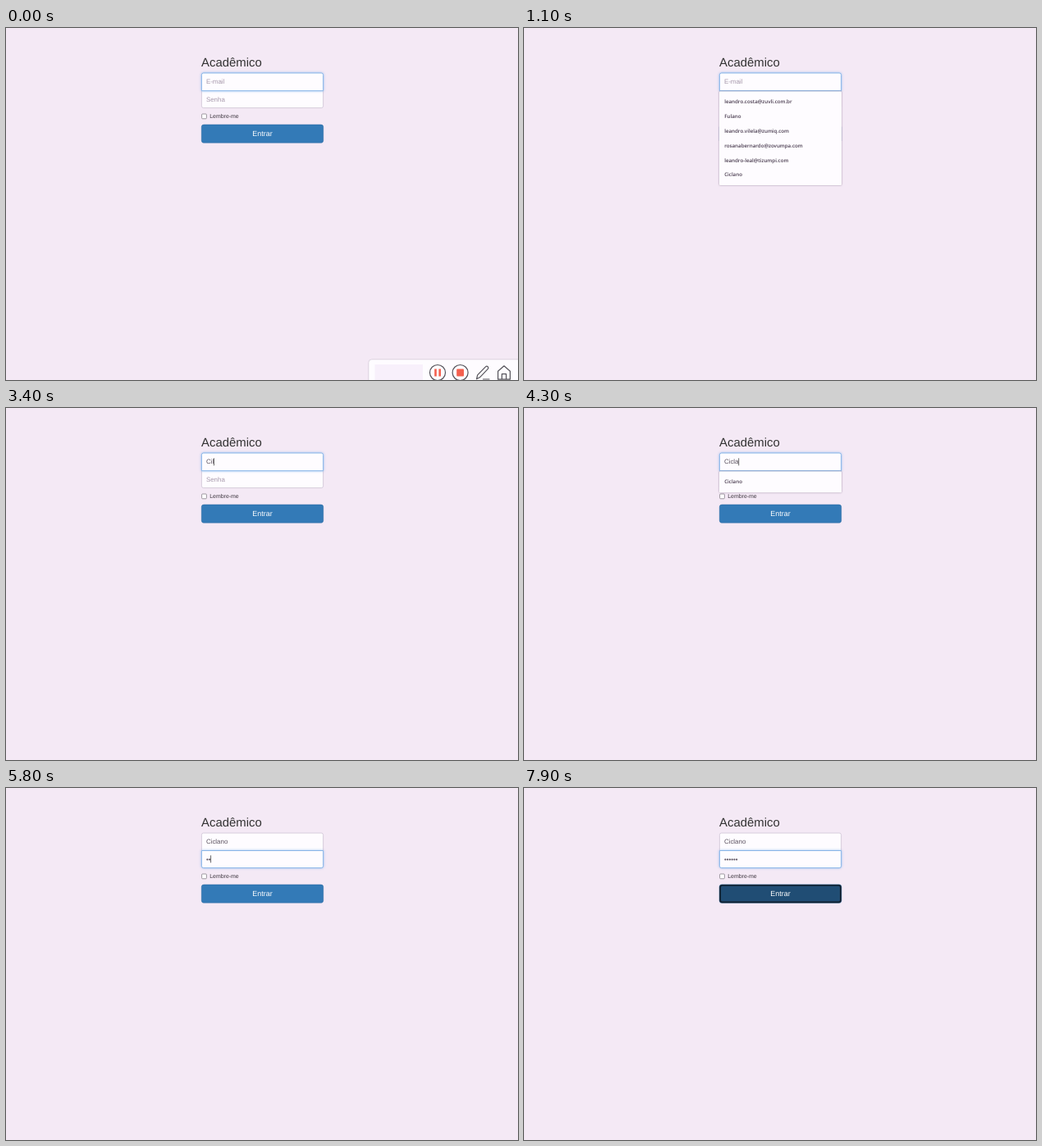
Animation, 624 px wide and 430 px high, one loop 8 s. Source, as an HTML page:

```html
<!DOCTYPE html>
<html lang="pt">
<head>
<meta charset="utf-8">
<style>
  html, body { margin: 0; width: 100%; height: 100%; overflow: hidden; background: #f4e9f5; }
  svg { display: block; width: 624px; height: 430px; }
  text { font: 7.95px "Liberation Sans", Arial, sans-serif; text-rendering: geometricPrecision; white-space: pre; }
  .box { fill: #fefcff; stroke-width: .9; }
  #menu text { font: 600 6.2px "Open Sans", "Noto Sans", sans-serif; fill: #4a3d50; }
  #menu rect { fill: #fefcff; filter: drop-shadow(0 .7px .8px rgba(60, 40, 70, .45)); }
  .icon { fill: none; stroke: #55535b; stroke-width: 1.2; stroke-linejoin: round; stroke-linecap: round; }
  .red { fill: #f4604f; stroke: none; }
</style>
</head>
<body>
<svg viewBox="0 0 624 430">
  <text x="238" y="47" style="font-size:14.9px" fill="#333">Acadêmico</text>

  <rect x="238.6" y="105" width="5.8" height="5.8" rx="1" fill="#fff" stroke="#767079" stroke-width=".7"/>
  <text x="248.2" y="110.3" style="font-size:6.96px" fill="#3d363f">Lembre-me</text>

  <rect id="halo" x="237.6" y="117.4" width="149.8" height="23.6" rx="3.4" fill="#b9c6dc"/>
  <rect id="button" x="238.3" y="118.1" width="148.4" height="22.1" rx="2.8" stroke-width=".6"/>
  <rect id="ring" x="239.2" y="119" width="146.6" height="20.4" rx="2.4" fill="none" stroke="#10202f" stroke-width="1.7"/>
  <text x="312.5" y="132" text-anchor="middle" style="font-size:8.95px" fill="#fff">Entrar</text>

  <g id="fields">
    <g id="pass">
      <path class="box" d="M238.4 76.5H386.6V95.3q0 2.3-2.3 2.3H240.7q-2.3 0-2.3-2.3Z"/>
      <text x="243.9" y="89.6"></text>
    </g>
    <g id="email">
      <path class="box" d="M238.4 76.7V57.3q0-2.3 2.3-2.3H384.3q2.3 0 2.3 2.3V76.7Z"/>
      <text x="243.9" y="68.4"></text>
    </g>
  </g>
  <rect id="caret" width=".8" height="9" fill="#444"/>

  <g id="menu"><rect x="238" y="77.6" width="149" rx="1"/></g>

  <g id="bar">
    <rect x="441.8" y="404.8" width="190" height="40" rx="4" fill="#fefcff" stroke="#d9d0dc" stroke-width=".9"/>
    <rect x="449.5" y="411" width="58.5" height="26" fill="#f8f0fb"/>
    <g class="icon">
      <circle cx="526" cy="421" r="9.5"/>
      <path class="red" d="M522.2 416.5h2.6v9h-2.6zM527.4 416.5h2.6v9h-2.6z"/>
      <circle cx="553.6" cy="421" r="9.5"/>
      <rect class="red" x="549.2" y="416.6" width="8.8" height="8.8" rx="1"/>
      <path d="M573.5 428.8l1.2-5 10-10.2q1.2-1 2.5.2t.2 2.6l-10 10.4zM581.5 429h7.5"/>
      <path d="M599.6 419.2l7.4-6.4 7.4 6.4v10h-14.8zM604.4 429v-6.4h5.2v6.4"/>
    </g>
  </g>
</svg>
<script>
const LOOP = 8000, STEP = 100;
const $ = id => document.getElementById(id);

// Each track lists [start time, value]; a value holds until the next start.
const tracks = {
  email: [[0, ''], [2900, 'C'], [3100, 'Ci'], [3400, 'Cil'], [3800, 'Ci'], [4000, 'Cic'],
          [4300, 'Cicla'], [4400, 'Ciclan'], [4600, 'Ciclano']],
  dots: [[0, 0], [5500, 1], [5800, 2], [6000, 3], [6300, 4], [6500, 5], [6600, 6]],
  menu: [[0, 0], [1100, 6], [2900, 1], [3400, 0], [3800, 1], [4600, 0]],
  caret: [[0, 0], [100, 1], [600, 0], [1200, 1], [1700, 0], [2200, 1], [2800, 0], [2900, 1], [7100, 0]],
  focus: [[0, 0], [5000, .5], [5100, 1]],
  button: [[0, '#337ab7'], [7600, '#2d6da4'], [7700, '#286090'], [7800, '#204d74']],
};
const at = (name, t) => tracks[name].findLast(([start]) => start <= t)[1];

const names = ['leandro.costa@zuvli.com.br', 'Fulano', 'leandro.vilela@zumiq.com',
               'rosanabernardo@zovumpa.com', 'leandro-leal@tizumpi.com', 'Ciclano'];
const rows = names.map((name, i) => {
  const row = document.createElementNS('http://www.w3.org/2000/svg', 'text');
  row.setAttribute('x', 244.2);
  row.setAttribute('y', 92.2 + i * 17.85);
  $('menu').append(row);
  return row;
});

const show = (el, on) => el.setAttribute('visibility', on ? 'visible' : 'hidden');

function drawField(id, value, hint, focus) {
  const [box, text] = $(id).children;
  box.style.stroke = `color-mix(in srgb, #7fb0e6 ${focus * 100}%, #d3c9d8)`;
  box.style.filter = focus ? `drop-shadow(0 0 1.8px rgba(102, 165, 233, ${.65 * focus}))` : 'none';
  text.textContent = value || hint;
  text.setAttribute('fill', value ? '#5c5360' : '#a698ab');
  return 243.9 + (value ? text.getComputedTextLength() : 0);
}

function draw(t) {
  const focus = at('focus', t), onPass = focus > 0;
  const ends = [
    drawField('email', at('email', t), 'E-mail', 1 - focus),
    drawField('pass', '•'.repeat(at('dots', t)), 'Senha', focus),
  ];
  $('fields').append($(onPass ? 'pass' : 'email'));
  $('caret').setAttribute('x', ends[+onPass] - .2);
  $('caret').setAttribute('y', onPass ? 82.3 : 61.3);
  show($('caret'), at('caret', t));

  const count = at('menu', t);
  show($('menu'), count);
  $('menu').firstElementChild.setAttribute('height', 8 + count * 17.75);
  const listed = count === 1 ? ['Ciclano'] : names.slice(0, count);
  rows.forEach((row, i) => row.textContent = listed[i] || '');

  $('button').setAttribute('fill', at('button', t));
  $('button').setAttribute('stroke', t < 7700 ? '#2e6da4' : '#204d74');
  show($('ring'), t >= 7900);
  show($('halo'), t >= 7900);

  const slide = Math.min(1, Math.max(0, (t - 300) / 400));
  $('bar').setAttribute('transform', `translate(0 ${slide * 27})`);
}

const begin = performance.now();
let last = -1;
function tick() {
  const elapsed = Math.max(0, performance.now() - begin);
  const t = Math.floor(elapsed % LOOP / STEP) * STEP;
  if (t !== last) draw(last = t);
  requestAnimationFrame(tick);
}
tick();
</script>
</body>
</html>
```
